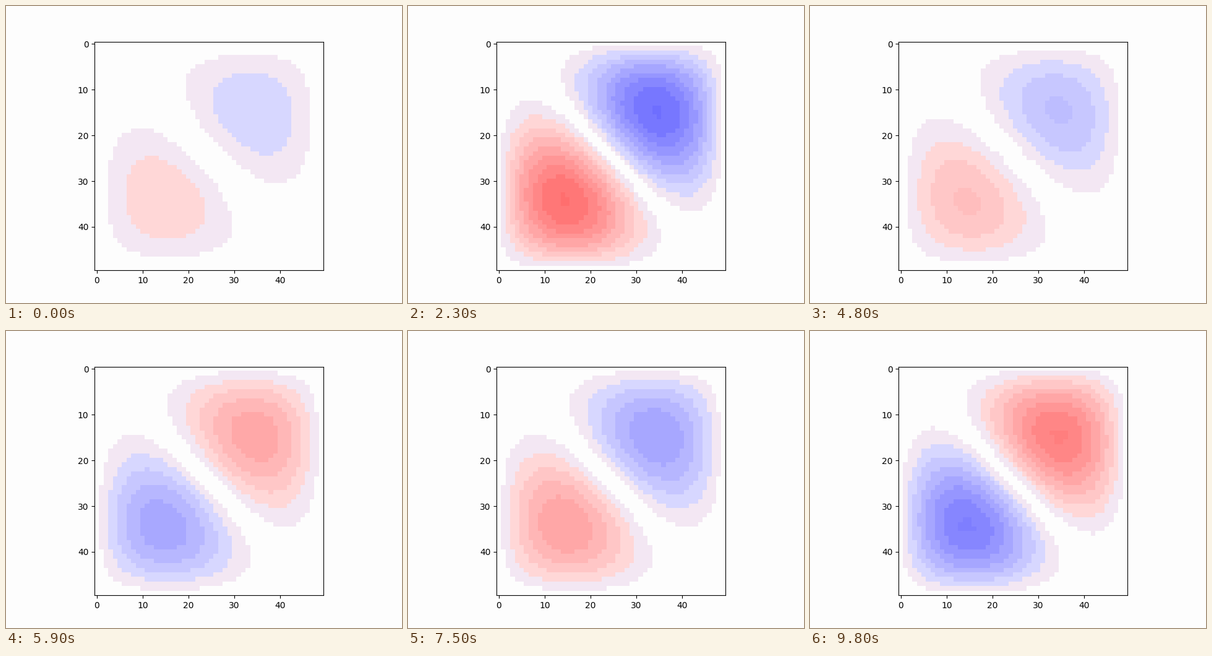
Recreate the animation shown at these times as a matplotlib script. Size 640 px wide and 480 px high, loop 9.9 s.

```python
import numpy as np
import matplotlib.pyplot as plt
from matplotlib.animation import FuncAnimation

SIZE = 50
FRAMES = 99
INTERVAL = 100
PAPER = 253 / 255

# Membrane mode on a square that is clamped one cell outside the grid
angle = np.arange(1, SIZE + 1) * np.pi / (SIZE + 1)
X, Y = np.meshgrid(angle, angle)
MODE = np.sin(X) * np.sin(Y) * (1.025 * np.cos(X) - 0.975 * np.cos(Y))
MODE /= np.abs(MODE).max()


def amplitude(n):
    phase = np.pi * (0.15075 * n + 0.4045)
    return 0.622 * np.exp(-0.00042 * n) * np.cos(phase)


def shade(n):
    """Blue-white-red picture, posterised into bands of 16 grey levels."""
    v = amplitude(n) * MODE
    level = 254 - 2 * np.floor(np.abs(v) * 128)
    band = level // 16
    rgb = np.full((SIZE, SIZE, 3), PAPER)
    for b in np.unique(band[band < 15]):
        cells = band == b
        g = level[cells].mean() / 255
        if b == 14:
            # the faintest band has one tint for both signs
            rgb[cells] = ((1 + g) / 2, g, (1 + g) / 2)
        else:
            rgb[cells & (v > 0)] = (1, g, g)
            rgb[cells & (v < 0)] = (g, g, 1)
    return rgb


fig, ax = plt.subplots(figsize=(6.4, 4.8), dpi=100)
fig.patch.set_facecolor((PAPER,) * 3)
ax.set_facecolor((PAPER,) * 3)
image = ax.imshow(shade(0), interpolation="nearest")


def update(n):
    image.set_data(shade(n))
    return (image,)


anim = FuncAnimation(fig, update, frames=FRAMES, interval=INTERVAL, repeat=True)
plt.show()
```
